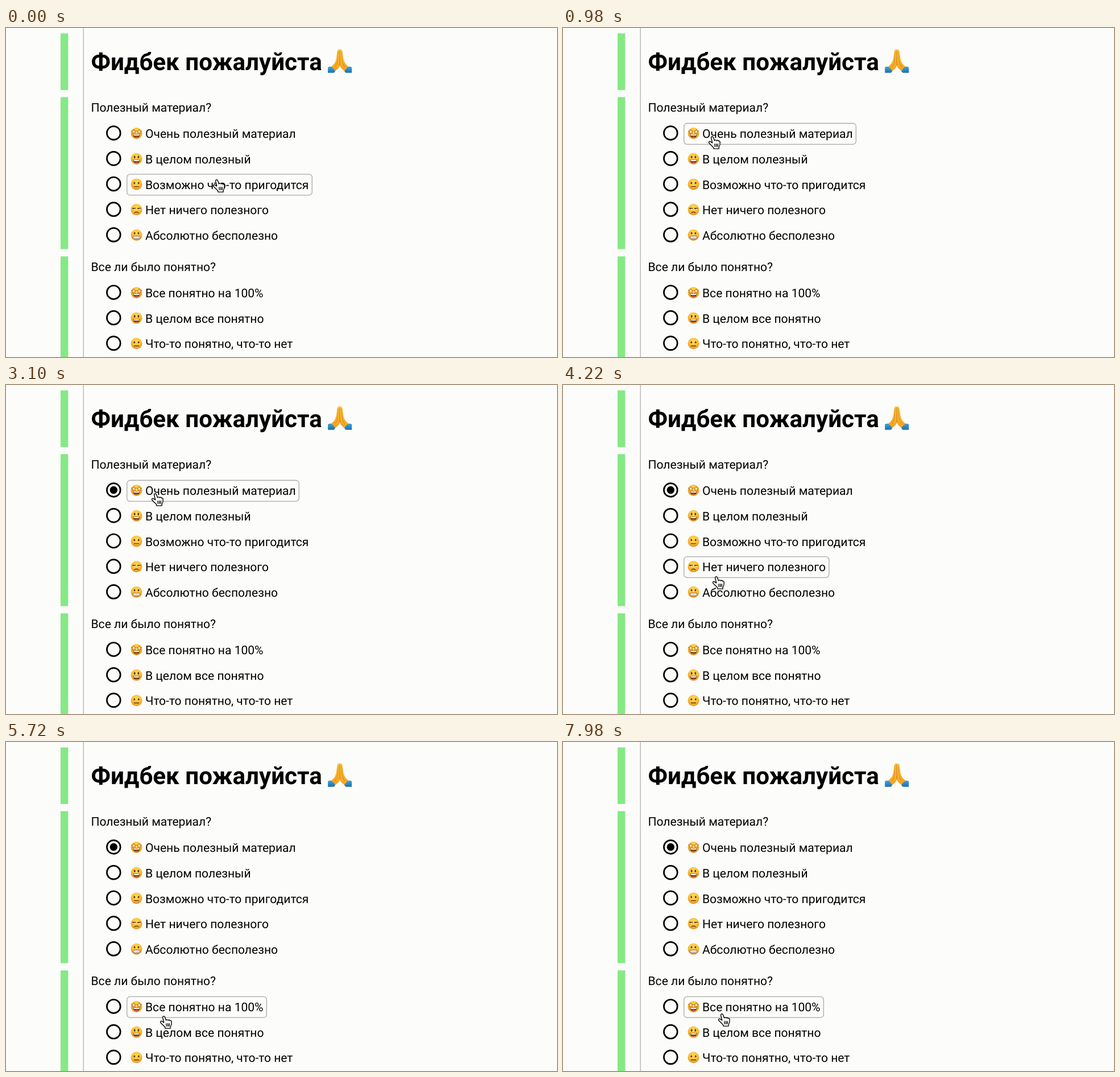
Animation of 969x578 px, one loop 8 s. Source, as an HTML page:

```html
<!DOCTYPE html>
<html lang="ru">
<head>
<meta charset="utf-8">
<title>Фидбек</title>
<style>
html, body { margin: 0; width: 100%; height: 100%; overflow: hidden; background: #fcfcfb; }
svg { display: block; }
text { font: 21.05px Roboto, sans-serif; text-rendering: geometricPrecision; }
.title { font-size: 42.1px; font-weight: 700; }
.bar { fill: #85e985; }
.ring { fill: none; stroke: #000; stroke-width: 2.7; }
.frame { fill: none; stroke: #a9a9a9; stroke-width: 1.3; visibility: hidden; }
.feature { fill: #5f3510; }
.line { fill: none; stroke: #5f3510; stroke-width: 1.4; stroke-linecap: round; }
</style>
</head>
<body>
<svg id="stage" width="969" height="578" viewBox="0 0 969 578">
  <defs>
    <radialGradient id="skin" cx=".5" cy=".34" r=".68">
      <stop offset="0" stop-color="#ffdd55"/>
      <stop offset=".55" stop-color="#fdbf38"/>
      <stop offset="1" stop-color="#e28a22"/>
    </radialGradient>
    <linearGradient id="palm" x2="0" y2="1">
      <stop offset="0" stop-color="#ffcf45"/>
      <stop offset="1" stop-color="#f49c1c"/>
    </linearGradient>
    <linearGradient id="cuff" x2="0" y2="1">
      <stop offset="0" stop-color="#3fa4dc"/>
      <stop offset="1" stop-color="#1c6fae"/>
    </linearGradient>
    <circle id="face" r="10" fill="url(#skin)"/>
    <path id="star" fill="#fff0b4" stroke="#b4601c" stroke-width=".9" stroke-linejoin="round"
      d="M0-4.4 1.3-1.5 4.4-1.3 2-.1 2.7 3.2 0 1.6-2.7 3.2-2-.1-4.4-1.3-1.3-1.5Z"/>
    <g id="grin">
      <path class="feature" d="M-6.2 1.2Q0 2.6 6.2 1.2Q5.6 7.8 0 7.8T-6.2 1.2Z"/>
      <path fill="#fff" d="M-5.3 1.8Q0 3 5.3 1.8L4.8 3.8Q0 4.8-4.8 3.8Z"/>
      <path fill="#e8574d" d="M-3 6.8Q0 4.9 3 6.8Q0 8.3-3 6.8Z"/>
    </g>
    <g id="starry">
      <use href="#face"/><use href="#grin"/>
      <use href="#star" x="-4.8" y="-2.6"/><use href="#star" x="4.8" y="-2.6"/>
    </g>
    <g id="smile">
      <use href="#face"/><use href="#grin"/>
      <ellipse class="feature" cx="-3.3" cy="-3" rx="1.4" ry="2.3"/>
      <ellipse class="feature" cx="3.3" cy="-3" rx="1.4" ry="2.3"/>
    </g>
    <g id="neutral">
      <use href="#face"/>
      <ellipse class="feature" cx="-3.7" cy="-2" rx="1.4" ry="1.8"/>
      <ellipse class="feature" cx="3.7" cy="-2" rx="1.4" ry="1.8"/>
      <path class="line" d="M-4 4.2H4"/>
    </g>
    <g id="unamused">
      <use href="#face"/>
      <path fill="#fff" d="M-7-2H-1.8Q-2.4-.1-4.4-.1T-7-2ZM1.8-2H7Q6.4-.1 4.4-.1T1.8-2Z"/>
      <path class="line" d="M-7-2.4H-1.8M1.8-2.4H7M-5.8-1.5H-5M2.8-1.5H3.6M-3.4 5.4Q0 2.8 3.4 5.4"/>
    </g>
    <g id="grimace">
      <use href="#face"/>
      <ellipse class="feature" cx="-3.4" cy="-3.2" rx="1.4" ry="1.9"/>
      <ellipse class="feature" cx="3.4" cy="-3.2" rx="1.4" ry="1.9"/>
      <rect x="-6.2" y="1.4" width="12.4" height="5.2" rx="2.5" fill="#fff" stroke="#805025" stroke-width=".9"/>
      <path d="M-5.8 4H5.8M-3 1.6V6.4M0 1.6V6.4M3 1.6V6.4" stroke="#a9a49c" stroke-width=".6"/>
    </g>
    <g id="halfHands">
      <path fill="url(#palm)" d="M0 38.4Q-1.8 36-3.6 38.2Q-4.7 40-5 44L-6.6 55Q-7.4 59.5-11 64L-16.5 69-10 77.5-3.5 71.5Q0 68.5 0 64Z"/>
      <path fill="none" stroke="#d88418" d="M-2.8 41-3.8 56Q-4.2 63-8.5 68"/>
      <path fill="url(#cuff)" d="M-21 69Q-17.5 67-15 68Q-10.5 70.5-8.4 75.5Q-9 78.8-11.5 78.8H-21Z"/>
    </g>
  </defs>

  <path class="bar" d="M96 9.6h13.3V109H96ZM96 121.5h13.3v267H96ZM96 401.3h13.3V578H96Z"/>
  <path d="M136.2 0V578" stroke="#b0b0b0" stroke-width="1.3"/>
  <text class="title" x="149.5" y="73.5">Фидбек пожалуйста</text>
  <g transform="translate(587.1)">
    <use href="#halfHands"/>
    <use href="#halfHands" transform="scale(-1 1)"/>
    <path d="M0 39V66" stroke="#cf7a14" stroke-width="1.2"/>
  </g>
  <text x="149.5" y="147">Полезный материал?</text>
  <text x="149.5" y="427">Все ли было понятно?</text>
  <g id="rows"></g>

  <path id="arrow" fill="#000" stroke="#fff" stroke-width="1.3" stroke-linejoin="round"
    d="M0 0V18.6L4.3 14.7 7.4 22 10.8 20.5 7.7 13.5H13.4Z"/>
  <g id="hand" stroke="#000" stroke-width="1.4" stroke-linejoin="round" stroke-linecap="round">
    <g transform="translate(-1.5 .8)">
      <path fill="#fff" d="M-2 1.8C-1.7-.5 1-.5 1.8 1.2L4 7C5 5.6 7 5.8 7.6 7.2 8.6 6 10.4 6.3 10.9 7.9 12 7.2 13.6 7.8 13.6 9.6 14 13 13 16 11.8 18.2L11.5 21.3H2.5L2 19C-1 16-3.6 13.5-5.5 11.5-7 9.3-4.8 7.8-2.8 9L.2 11Z"/>
      <path fill="none" d="M4.5 13 4.7 17.4M7.2 13V17.4M9.8 13 9.6 17.4"/>
    </g>
  </g>
</svg>
<script>
const LOOP = 8000, CLICK = 2400;
const byId = id => document.getElementById(id);

// emoji, label, centre y, right edge of the hover frame
const options = [
  ['starry', 'Очень полезный материал', 184.5, 516],
  ['smile', 'В целом полезный', 229.2, 437],
  ['neutral', 'Возможно что-то пригодится', 273.9, 539],
  ['unamused', 'Нет ничего полезного', 318.6, 468.5],
  ['grimace', 'Абсолютно бесполезно', 363.3, 484.5],
  ['starry', 'Все понятно на 100%', 464.4, 459],
  ['smile', 'В целом все понятно', 509.1, 460],
  ['neutral', 'Что-то понятно, что-то нет', 553.8, 511]
];

byId('rows').innerHTML = options.map(([emoji, label, y, right]) => `
  <circle class="ring" cx="189.3" cy="${y}" r="11.9"/>
  <rect class="frame" x="212.7" y="${y - 17}" width="${right - 213.4}" height="36.8" rx="5.5"/>
  <use href="#${emoji}" x="229.5" y="${y + .5}"/>
  <text x="245" y="${y + 8.6}">${label}</text>`).join('') +
  '<circle id="dot" cx="189.3" cy="184.5" r="6.7"/>';

const frames = document.querySelectorAll('.frame');

// time, x, y of the pointer tip
const path = [
  [0, 372, 266], [440, 268, 206], [640, 264, 190], [3450, 264, 190],
  [4220, 271, 336], [5000, 279, 481], [5800, 279, 481], [6500, 281, 477], [LOOP, 281, 477]
];

function pointerAt(t) {
  const i = path.findIndex(p => p[0] > t);
  const [t0, x0, y0] = path[i - 1], [t1, x1, y1] = path[i];
  const u = (t - t0) / (t1 - t0), k = u * u * (3 - 2 * u);
  return [x0 + (x1 - x0) * k, y0 + (y1 - y0) * k];
}

const show = (el, on) => { el.style.visibility = on ? 'visible' : 'hidden'; };

function draw() {
  const t = performance.now() % LOOP;
  const [x, y] = pointerAt(t);
  const hovered = options.findIndex(([, , cy, right]) =>
    x > 212 && x < right && Math.abs(y - cy - 1.4) < 19);
  frames.forEach((el, i) => show(el, i === hovered));
  show(byId('dot'), t >= CLICK);
  show(byId('hand'), hovered >= 0);
  show(byId('arrow'), hovered < 0);
  for (const id of ['hand', 'arrow'])
    byId(id).setAttribute('transform', `translate(${x} ${y})`);
  requestAnimationFrame(draw);
}
draw();
</script>
</body>
</html>
```
